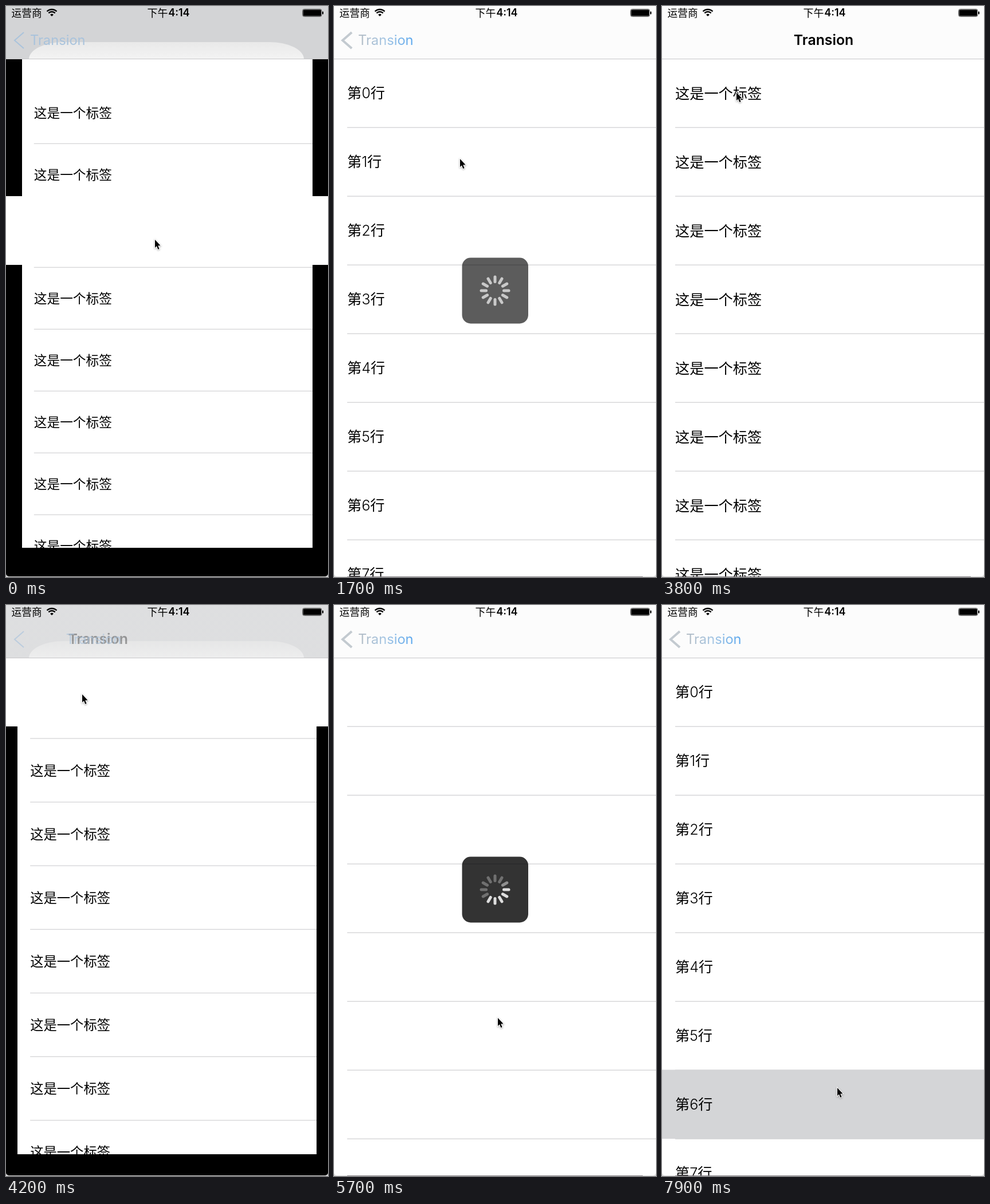
An HTML page with a canvas for the animation above (8000 ms loop, 562 by 997 pixels).

```html
<!DOCTYPE html>
<html lang="zh">
<head>
<meta charset="utf-8">
<style>
html, body { margin: 0; width: 562px; height: 997px; overflow: hidden; background: #fff; }
canvas { display: block; }
</style>
</head>
<body>
<canvas id="stage" width="562" height="997"></canvas>
<script>
const W = 562, H = 997, NAV = 92, ROW = 120, LOOP = 8000, STEP = 100;
const FONT = 'Inter, "Noto Sans CJK SC", "Noto Sans CJK", sans-serif';
const ctx = document.getElementById('stage').getContext('2d');

// Pointer path: time, x, y
const path = [
  [0, 260, 408], [600, 260, 405], [1700, 220, 267], [2400, 105, 77], [2800, 105, 77],
  [3800, 130, 151], [4200, 133, 156], [4700, 150, 191], [5700, 286, 721],
  [6400, 300, 862], [7000, 302, 862], [7900, 306, 843], [8000, 306, 843]
];
const clicks = [2600, 3900, 6500];

const mix = (a, b, p) => a + (b - a) * p;
const ramp = (t, a, b) => Math.min(1, Math.max(0, (t - a) / (b - a)));
const ease = (t, a, b) => {
  const p = ramp(t, a, b);
  return p * p * (3 - 2 * p);
};

function rect(x, y, w, h, color) {
  ctx.fillStyle = color;
  ctx.fillRect(x, y, w, h);
}

function round(x, y, w, h, r, color) {
  ctx.beginPath();
  ctx.roundRect(x, y, w, h, r);
  ctx.fillStyle = color;
  ctx.fill();
}

function gradient(x0, y0, x1, y1, ...colors) {
  const g = ctx.createLinearGradient(x0, y0, x1, y1);
  colors.forEach((c, i) => g.addColorStop(i / (colors.length - 1), c));
  return g;
}

function text(str, x, y, size, weight = 400, color = '#000', align = 'left') {
  ctx.font = `${weight} ${size}px ${FONT}`;
  ctx.textAlign = align;
  ctx.fillStyle = color;
  ctx.fillText(str, x, y);
}

function line(points, width, color) {
  ctx.beginPath();
  points.forEach(([x, y]) => ctx.lineTo(x, y));
  ctx.lineWidth = width;
  ctx.strokeStyle = color;
  ctx.stroke();
}

// A full page of rows; label(i) gives each row's text
function table(label, baseline, selected = -1) {
  rect(0, 0, W + 1, H, '#fff');
  for (let i = 0; i < 8; i++) {
    const y = NAV + i * ROW;
    rect(23, y + ROW - 0.5, W - 22, 1.3, '#d2d2d4');
    if (i === selected) rect(0, y - 0.5, W, ROW + 0.5, '#d4d5d7');
    text(label(i), 23, y + baseline, 25.2, 350);
  }
}

function scaledTable(k, selected) {
  const s = 1 - 0.1 * k, cx = 281.25, cy = 494;
  const left = Math.floor(cx - cx * s), right = Math.ceil(cx + cx * s);
  const top = Math.round(cy - cy * s), bottom = Math.round(cy + (H - 1 - cy) * s);
  rect(0, 0, W, H, '#000');
  ctx.save();
  ctx.beginPath();
  ctx.rect(left, top, right - left, bottom - top);
  ctx.clip();
  rect(left, top, right - left, bottom - top, '#fff');
  ctx.translate(cx, cy);
  ctx.scale(s, s);
  ctx.translate(-cx, -cy);
  table(() => '这是一个标签', 70, selected);
  ctx.restore();
}

function hud(t, alpha, loaded) {
  if (alpha <= 0) return;
  ctx.save();
  ctx.globalAlpha = alpha;
  round(223.5, 439.5, 115.5, 115, 15, 'rgba(0,0,0,.8)');
  ctx.translate(281, 497);
  ctx.lineCap = 'round';
  const head = Math.floor((t - 5700) * 12 / 1000) + 7;
  for (let i = 0; i < 12; i++) {
    const lag = (((head - i) % 12) + 12) % 12;
    const light = loaded || lag < 5 ? 0.84 : lag === 5 ? 0.45 : 0.3;
    ctx.save();
    ctx.rotate(i * Math.PI / 6);
    line([[0, -15.5], [0, -24]], 5, `rgba(255,255,255,${light})`);
    ctx.restore();
  }
  ctx.restore();
}

function statusBar() {
  text('运营商', 9.5, 18.5, 17.7, 350);
  text('下午', 246.5, 18.5, 18, 500);
  text('4:14', 320.5, 18, 18, 600, '#000', 'right');
  for (const r of [4, 8, 12]) {
    ctx.beginPath();
    ctx.arc(80, 18, r, -Math.PI * 0.75, -Math.PI * 0.25);
    if (r === 4) ctx.lineTo(80, 18);
    ctx.lineWidth = 2.4;
    ctx.strokeStyle = ctx.fillStyle = '#000';
    r === 4 ? ctx.fill() : ctx.stroke();
  }
  ctx.beginPath();
  ctx.roundRect(517.5, 5.5, 33.5, 13, 3);
  ctx.lineWidth = 1;
  ctx.strokeStyle = '#555';
  ctx.stroke();
  round(518.5, 6.5, 31.5, 11, 1.5, '#000');
  round(552, 9.5, 2, 5, 1, '#000');
}

function navBar(k, top, back, pressed) {
  rect(0, 0, W, NAV, '#fcfcfc');
  // Blurred dark backdrop showing through the translucent bar
  const cover = ramp(top, 0, NAV);
  if (k > 0 && cover > 0) {
    const shade = a => `rgba(211,212,214,${a})`;
    ctx.save();
    ctx.beginPath();
    ctx.rect(0, 0, W, NAV);
    ctx.clip();
    ctx.globalAlpha = k;
    rect(0, 0, W, NAV, gradient(0, 0, 0, NAV, shade(ramp(top, 0, 40)), shade(cover)));
    ctx.globalAlpha = k * cover;
    round(40, 63, 480, 90, { x: 60, y: 30 }, gradient(0, 63, 0, NAV, '#e9e9e9', '#f3f3f3'));
    ctx.restore();
  }
  rect(0, NAV, W, 1, '#c6c6c8');
  statusBar();

  ctx.save();
  ctx.globalAlpha = 1 - back;
  text('Transion', mix(282, 100, back), 68, 24.8, 600, '#000', 'center');
  ctx.globalAlpha = back;
  const faint = k > 0 && top > 60;
  line([[31, 46], [15, 60], [31, 74]], faint ? 2 : 4, faint ? '#a9c3dc' : '#c3cad0');
  const tint = gradient(42, 0, 139, 0, '#b4bcc4', '#a5c6e4', '#58a6ee');
  text('Transion', mix(230, 42, back), 68, 23.7, 400,
    pressed ? '#d3d9de' : faint ? '#a9c3dc' : tint);
  ctx.restore();
}

function pointer(t) {
  const n = path.findIndex(p => p[0] > t);
  const [a, b] = [path[n - 1], path[n]];
  const p = ramp(t, a[0], b[0]);
  const x = mix(a[1], b[1], p), y = mix(a[2], b[2], p);
  if (clicks.includes(t)) {
    ctx.beginPath();
    ctx.arc(x, y + 1, 21, 0, 2 * Math.PI);
    ctx.lineWidth = 2.6;
    ctx.strokeStyle = '#000';
    ctx.stroke();
  }
  ctx.save();
  ctx.translate(x, y);
  ctx.beginPath();
  [[0, 0], [0, 14], [3, 11.2], [5.3, 17], [7.6, 16], [5.2, 10.4], [9.6, 10.2]]
    .forEach(([px, py]) => ctx.lineTo(px, py));
  ctx.closePath();
  ctx.shadowColor = 'rgba(0,0,0,.35)';
  ctx.shadowBlur = 3;
  ctx.shadowOffsetY = 1;
  ctx.lineWidth = 2;
  ctx.strokeStyle = '#fff';
  ctx.stroke();
  ctx.shadowColor = 'transparent';
  ctx.fillStyle = '#000';
  ctx.fill();
  ctx.restore();
}

function draw(t) {
  const second = t >= 3900;
  const start = second ? 4300 : 0;
  const row = second ? 0 : 2;
  const shrink = second ? ease(t, 4000, 4300) : 1 - ease(t, 3200, 3500);
  const open = second ? ease(t, 4300, 4800) : ease(t, 0, 500) - ease(t, 2700, 3200);
  const back = second ? ramp(t, 4000, 4300) : 1 - ramp(t, 2700, 3100);
  const cellTop = NAV + row * ROW;
  const top = mix(cellTop, 0, open);
  const age = t - start;
  const loaded = age >= 1600;

  if (open === 1) {
    table(i => loaded ? `第${i}行` : '', 69, t >= 6600 ? 6 : -1);
    hud(t, loaded ? 1 - ramp(age, 1600, 2100) : ramp(age, 400, 700), loaded);
  } else {
    scaledTable(shrink, t === 3900 ? 0 : -1);
    if (shrink > 0) rect(0, top, W, mix(cellTop + ROW, H, open) - top, '#fff');
  }
  navBar(shrink, top, back, t === 2600);

  // Rounded bottom corners and window edge
  ctx.beginPath();
  ctx.rect(0, 0, W, H);
  ctx.roundRect(0, -20, W, H + 19, 5);
  ctx.fillStyle = '#dedede';
  ctx.fill('evenodd');
  if (open === 1 || shrink === 0) rect(23, H - 1, 516, 1, '#858085');
  pointer(t);
}

let origin;
function frame(now) {
  origin ??= now;
  draw(Math.floor((now - origin) % LOOP / STEP) * STEP);
  requestAnimationFrame(frame);
}
requestAnimationFrame(frame);
</script>
</body>
</html>
```
